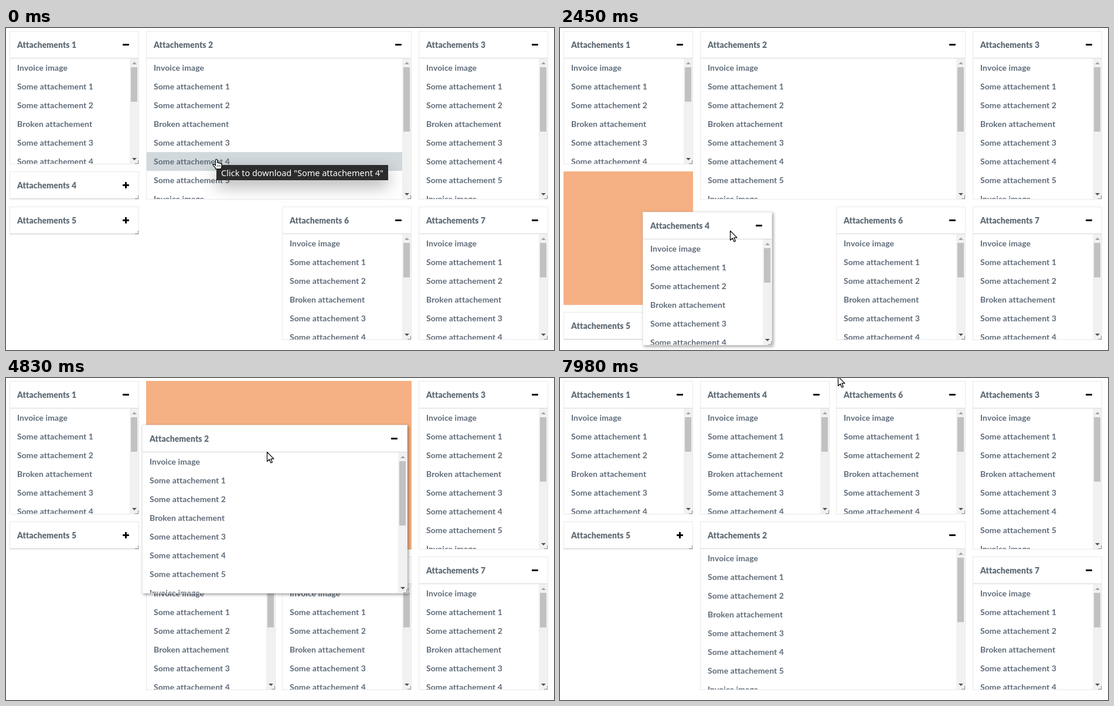
An HTML page for the animation above (8 s loop, 935 by 550 pixels).

```html
<!DOCTYPE html>
<html lang="en">
<head>
<meta charset="utf-8">
<title>Attachment grid</title>
<style>
  html, body { margin: 0; width: 100%; height: 100%; overflow: hidden; background: #fff; }
  #stage { position: relative; width: 935px; height: 550px; overflow: hidden;
    font: 700 14px Lato, sans-serif; letter-spacing: .07px; color: #606c7a; }
  #stage * { box-sizing: border-box; }
  .panel { position: absolute; background: #fff; border: 1px solid #e9e9e9; overflow: hidden; }
  .panel.lifted { z-index: 3; }
  .head { height: 46px; line-height: 45px; padding-left: 12px; font-weight: 900; color: #606c76;
    border-bottom: 1px solid #d6d6d6; white-space: nowrap; }
  .icon::before, .icon.plus::after { content: ""; position: absolute; background: #000; border-radius: 1px; }
  .icon::before { right: 16px; top: 21px; width: 11px; height: 3px; }
  .icon.plus::after { right: 20px; top: 17px; width: 3px; height: 11px; }
  .body { position: absolute; left: 0; right: 0; top: 46px; bottom: 0; overflow: hidden; }
  .row { height: 32px; line-height: 32px; padding-left: 12px; margin-right: 15px; white-space: nowrap; }
  .row.on { background: #d1d9dc; }
  .bar { position: absolute; right: 0; top: 0; bottom: 0; width: 15px; background: #f1f1f1; }
  .thumb { position: absolute; left: 2px; top: 15px; width: 11px; background: #c1c1c1; }
  .bar i { position: absolute; left: 4px; border: 4px solid transparent; border-width: 0 4px; }
  .bar .up { top: 6px; border-bottom: 4px solid #a3a3a3; }
  .bar .down { bottom: 6px; border-top: 4px solid #505050; }
  .grip { position: absolute; right: 0; bottom: 0; width: 6px; height: 6px;
    border: solid rgba(0, 0, 0, .4); border-width: 0 1px 1px 0; }
  #slot { position: absolute; z-index: 2; background: #f5b183; }
  #tip { position: absolute; left: 359px; top: 234px; width: 293px; height: 26px; z-index: 4;
    background: #2c2c2c; color: #fff; font: 400 14.5px/26px "Noto Sans", sans-serif; letter-spacing: 0;
    text-align: center; white-space: nowrap; box-shadow: 0 10px 28px rgba(0, 0, 0, .32); }
  #cursor { position: absolute; left: 0; top: 0; z-index: 5; overflow: visible; }
  #cursor path { fill: #fff; stroke: #000; stroke-width: 1.2; stroke-linejoin: round; }
  #cursor .knuckles { stroke-width: .7; }
</style>
</head>
<body>
<div id="stage">
  <div id="slot"></div>
  <div id="tip">Click to download "Some attachement 4"</div>
  <svg id="cursor" width="20" height="22">
    <path id="arrow" d="M.5.5V16.5L4.3 13 6.8 19 9.4 17.9 6.9 12.1H12Z"/>
    <g id="hand" transform="translate(-6.5 0)">
      <path d="M5 11V2a1.6 1.6 0 0 1 3.2 0v4.2q1.6-.8 2.6.6 1.7-.6 2.4.7 2.3-.4 2.3 1.8v3.2q0 1.5-1.2 4.3H5.2L4.8 14.8 1 10.6Q.2 9.2 1.4 8.6q1.6-.5 3.6 2.4Z"/>
      <path class="knuckles" d="M8.2 10v3M10.4 10v3M12.6 10v3"/>
    </g>
  </svg>
</div>
<script>
const LOOP = 8000, STEP = 70, HEAD = 47, ROW = 32;
const ITEMS = ['Invoice image', 'Some attachement 1', 'Some attachement 2', 'Broken attachement',
  'Some attachement 3', 'Some attachement 4', 'Some attachement 5'];
const byId = id => document.getElementById(id);
const lerp = (a, b, k) => a + (b - a) * k;
const clamp = k => Math.min(1, Math.max(0, k));

// CSS "ease", cubic-bezier(.25, .1, .25, 1)
function ease(x) {
  if (x <= 0 || x >= 1) return clamp(x);
  const curve = (p, q, s) => 3 * p * s * (1 - s) ** 2 + 3 * q * s * s * (1 - s) + s ** 3;
  let lo = 0, hi = 1;
  for (let i = 0; i < 24; i++) {
    const mid = (lo + hi) / 2;
    if (curve(.25, .25, mid) < x) lo = mid; else hi = mid;
  }
  return curve(.1, 1, lo);
}
const slide = (t, start, a, b, length = 200) => lerp(a, b, ease((t - start) / length));

const OPEN = 880, SWAP_4 = 2919, SWAP_2 = 5310;
const GRAB_4 = 1660, DROP_4 = 3410, GRAB_2 = 4400, DROP_2 = 5930;

// Pointer strokes: start, end, destination
const STROKES = [
  [50, 420, 198, 270], [1180, 1540, 155, 277],
  [GRAB_4, 2000, 180, 287], [2060, 2450, 290, 346], [2860, 2980, 360, 324], [3010, 3150, 380, 331],
  [DROP_4, 4040, 448, 250], [4080, 4280, 451, 14], [4300, 4390, 452, 33],
  [GRAB_2, 4680, 445, 58], [4710, 5020, 445, 160], [5040, 5600, 462, 280],
  [6400, 6720, 470, -19], [7970, 7980, 474, -3]
];
function pointer(t) {
  let x = 359, y = 224;
  for (const [start, end, toX, toY] of STROKES) {
    const k = ease((t - start) / (end - start));
    x = lerp(x, toX, k);
    y = lerp(y, toY, k);
  }
  return [x, y];
}

// Grid lengths: columns are 698/3 px apart, rows 60 px, gaps 12 px.
const colX = c => 6 + c * 698 / 3, rowY = r => 5 + r * 60;
const cell = (c, r, rows, cols = 1) =>
  ({ x: colX(c), y: rowY(r), w: cols * 698 / 3 - 12, h: rows * 60 - 12, shadow: 0 });

// A held panel follows the pointer slightly late, then settles into its cell.
function drag(p, t, grab, drop, homeX, homeY) {
  if (t < grab) return;
  const [fromX, fromY] = pointer(grab), [x, y] = pointer(t - 30);
  const end = pointer(drop);
  if (t < drop) {
    p.x += x - fromX;
    p.y += y - fromY;
    p.shadow = 1;
  } else {
    p.x = slide(t, drop, p.x + end[0] - fromX, homeX);
    p.y = slide(t, drop, p.y + end[1] - fromY, homeY);
  }
}

function layout(t) {
  const p1 = cell(0, 0, 4), p2 = cell(1, 0, 5, 2), p3 = cell(3, 0, 5), p4 = cell(0, 4, 1);
  const p5 = cell(0, 5, 1), p6 = cell(2, 5, 4), p7 = cell(3, 5, 4);
  const rise = slide(t, SWAP_2, rowY(5), rowY(0));

  p4.h = slide(t, OPEN, 48, 228);
  p5.y = t < SWAP_4 ? slide(t, OPEN, rowY(5), rowY(8)) : slide(t, SWAP_4, rowY(8), rowY(4));
  p6.y = rise;
  drag(p4, t, GRAB_4, DROP_4, colX(1), rowY(5));
  drag(p2, t, GRAB_2, DROP_2, colX(1), rowY(4));
  if (t > SWAP_2) p4.y = rise;
  if (t < OPEN) p4.shadow = clamp((t - 560) / 210);

  let slot = null;
  if (t >= GRAB_4 && t < DROP_4) {
    slot = cell(0, 4, 4);
    slot.x = slide(t, SWAP_4, colX(0), colX(1), 100);
    slot.y = slide(t, SWAP_4, rowY(4), rowY(5), 100);
  } else if (t >= GRAB_2 && t < DROP_2) {
    slot = cell(1, 0, 5, 2);
    slot.y = slide(t, SWAP_2, rowY(0), rowY(4), 100);
  }
  return { panels: [p1, p2, p3, p4, p5, p6, p7], slot };
}

const stage = byId('stage');
const views = Array.from({ length: 7 }, (_, n) => {
  const el = document.createElement('div');
  el.className = 'panel';
  const rows = [...ITEMS, ...ITEMS].map(name => `<div class="row">${name}</div>`).join('');
  el.innerHTML = `<div class="head">Attachements ${n + 1}</div><div class="icon"></div>
    <div class="body">${rows}<div class="bar"><i class="up"></i><div class="thumb"></div><i class="down"></i></div></div>
    <div class="grip"></div>`;
  stage.insertBefore(el, byId('slot'));
  const find = s => el.querySelector(s);
  return { el, icon: find('.icon'), body: find('.body'), thumb: find('.thumb'), rows: [...el.querySelectorAll('.row')] };
});

function place(el, box) {
  const px = v => Math.round(v) + 'px';
  Object.assign(el.style, { left: px(box.x), top: px(box.y), width: px(box.w), height: px(box.h) });
}

// What lies under the pointer: a row, a toggle button or nothing.
function hit(panels, [px, py]) {
  for (const [n, p] of panels.entries()) {
    const x = px - p.x, y = py - p.y;
    if (x < 0 || x > p.w || y < 0 || y > p.h) continue;
    if (y < HEAD) return { button: Math.abs(x - p.w + 23) < 10 };
    return x < p.w - 16 ? { panel: n, row: Math.floor((y - HEAD) / ROW) } : {};
  }
  return {};
}

function render(t) {
  const { panels, slot } = layout(t);
  const under = slot ? {} : hit(panels, pointer(t + 45));

  panels.forEach((p, n) => {
    const v = views[n], space = p.h - HEAD - 1, open = space > 2;
    place(v.el, p);
    v.el.classList.toggle('lifted', p.shadow > 0);
    v.el.style.boxShadow = p.shadow ? `2px 2px 5px rgba(0,0,0,${.38 * p.shadow})` : 'none';
    v.icon.classList.toggle('plus', !open);
    v.body.style.display = open ? '' : 'none';
    v.thumb.style.height = Math.max(0, Math.round((space - 30) * space / 458)) + 'px';
    v.rows.forEach((row, i) => row.classList.toggle('on', under.panel === n && under.row === i));
  });

  byId('slot').style.display = slot ? '' : 'none';
  if (slot) place(byId('slot'), slot);
  byId('tip').style.display = t < STEP ? '' : 'none';

  const [x, y] = pointer(t);
  const pointing = under.button || under.row !== undefined;
  byId('cursor').style.transform = `translate(${Math.round(x)}px, ${Math.round(y)}px)`;
  byId('hand').style.display = pointing ? '' : 'none';
  byId('arrow').style.display = pointing ? 'none' : '';
}

const began = performance.now();
function tick() {
  const t = (performance.now() - began) % LOOP;
  render(Math.floor(t / STEP) * STEP);
  requestAnimationFrame(tick);
}
tick();
</script>
</body>
</html>
```
